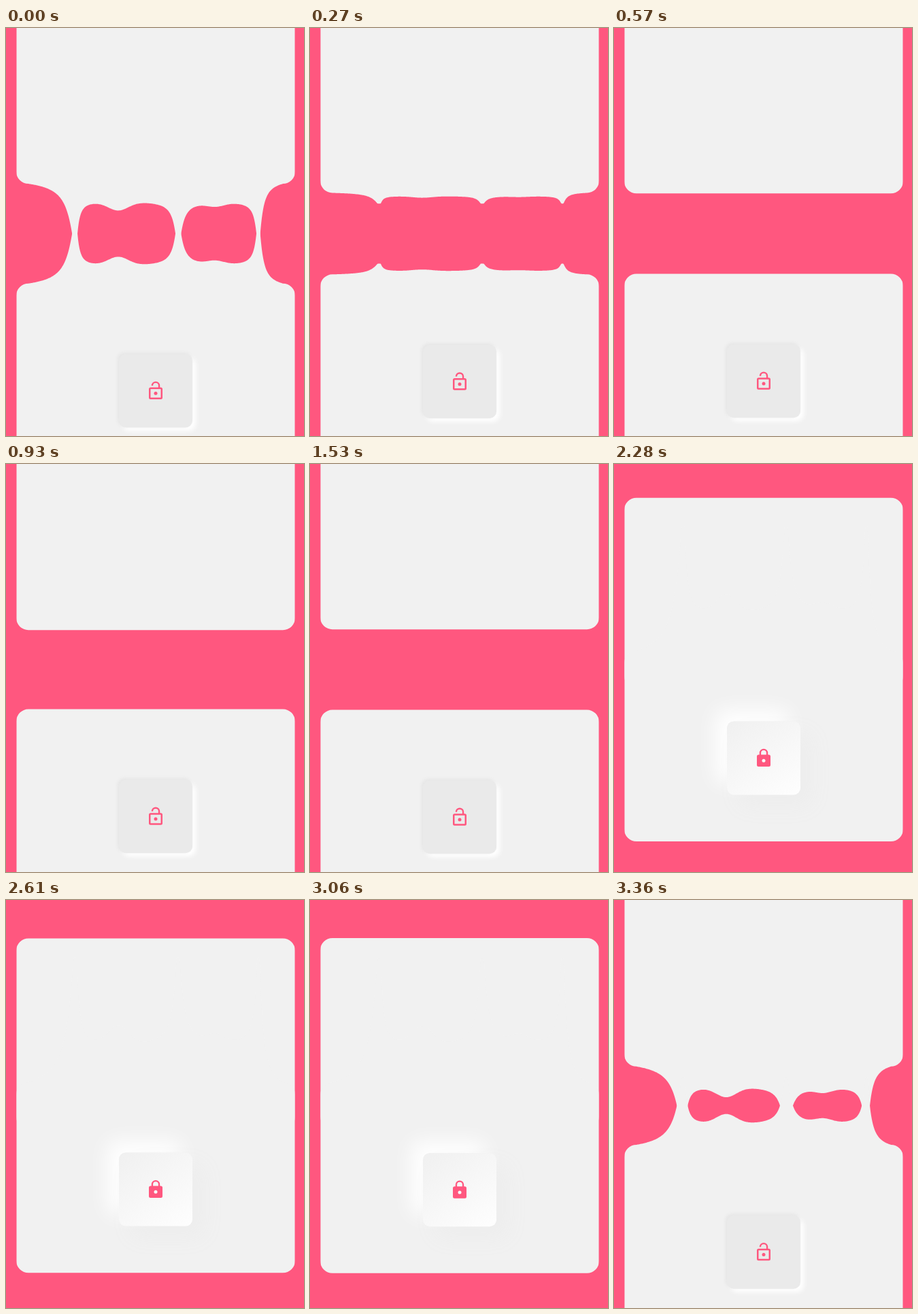
Animation of 438 by 600 pixels, one loop 3.39 s. Source, as an HTML page:

```html
<!DOCTYPE html>
<html lang="en">
<head>
<meta charset="utf-8">
<title>Lock toggle</title>
<style>
  html, body { margin: 0; width: 100%; height: 100%; overflow: hidden; background: #ff577f; }
  #stage { position: relative; width: 438px; height: 600px; overflow: hidden; }
  #panels { position: absolute; inset: 0; fill: #f1f1f1; clip-path: inset(0 13.5px 0 15.5px); }
  #button { position: absolute; left: 166px; top: 0; width: 108px; height: 108px; }
  .face { position: absolute; inset: 0; border-radius: 10px; }
  #raised {
    background: linear-gradient(145deg, #f0f0f0, #fefefe);
    box-shadow: 17px 17px 32px #ededed, -17px -17px 30px #fff;
  }
  #pressed {
    background: #eaeaea;
    box-shadow: -2px -2px 5px #e5e5e5, 5px 5px 7px #fff;
  }
  #icon { position: absolute; left: 39px; top: 39px; fill: none; stroke: #ff577f; stroke-width: 1.9; }
  #body { fill: #ff577f; stroke-width: 2; }
  #dot { fill: #f8f8f8; stroke: none; }
  .open #body { fill: none; }
  .open #dot { fill: #ff577f; }
  .open #stem { display: none; }
</style>
</head>
<body>
<div id="stage">
  <svg id="panels" width="438" height="600"><path id="upper"/><path id="lower"/></svg>
  <div id="button">
    <div class="face" id="raised"></div>
    <div class="face" id="pressed"></div>
    <svg id="icon" width="30" height="30" viewBox="0 0 24 24">
      <path d="M7.95 6a4.05 4.05 0 0 1 8.1 0v3"/>
      <path id="stem" d="M7.95 5.9V9"/>
      <rect id="body" x="5" y="9" width="14" height="12" rx="1"/>
      <circle id="dot" cx="12" cy="15" r="2"/>
    </svg>
  </div>
</div>
<script>
const LOOP = 3390, OPEN_AT = 3214 - LOOP, CLOSE_AT = 1599, CLOSE_SHOWN = 1638;
const LEFT = 15, RIGHT = 425, HEIGHT = 280.4, RADIUS = 18, MIDDLE = 302.4;
const CLOSED = -33.4, OPENED = 59.3;

// Strands of goo: position and how widely each side spreads.
const STRANDS = [
  { x: 102.5, left: 10, right: 3.5 },
  { x: 253, left: 5.5, right: 6 },
  { x: 371, left: 4, right: 5 }
];
const PEAK = 116, TIP = 98, FILM = 28;

const $ = id => document.getElementById(id);
const clamp = v => Math.min(1, Math.max(0, v));
const falloff = d => 1 / (1 + d ** 1.5);
const hump = (x, center, width) => Math.exp(-(((x - center) / width) ** 2));

function elasticOut(u) {
  if (u <= 0) return 0;
  return 1 + 2 ** (-10 * u) * Math.sin((u - 0.075) * 2 * Math.PI / 0.3);
}

// How far the goo reaches beyond a panel's straight edge at x.
function gooAt(x) {
  const next = STRANDS.findIndex(s => s.x > x);
  const a = STRANDS.at(next < 0 ? -1 : next - 1), b = STRANDS[next];
  if (next === 0) {
    const d = b.x - x;
    return PEAK * falloff(d / b.left) * (1 - (d / (b.x - LEFT - RADIUS)) ** 2);
  }
  if (next < 0) {
    const d = x - a.x;
    return PEAK * falloff(d / a.right) * (1 - (d / (RIGHT - RADIUS - a.x)) ** 2);
  }
  const film = FILM + 14 * hump(x, 165, 21) + 6 * hump(x, 308, 18);
  return film + (PEAK - FILM) * (falloff((x - a.x) / a.right) + falloff((b.x - x) / b.left));
}

const goo = [];
for (let x = RIGHT - RADIUS; x >= LEFT + RADIUS; x--) goo.push([x, Math.min(TIP, gooAt(x))]);

function panelPath(reach) {
  const r = RADIUS, arc = (dx, dy) => `a${r} ${r} 0 0 1 ${dx} ${dy}`;
  const edge = goo.map(([x, y]) => `L${x} ${(y * reach).toFixed(2)}`).join("");
  return `M${LEFT} ${r - HEIGHT}${arc(r, -r)}H${RIGHT - r}${arc(r, r)}V${-r}${arc(-r, r)}`
    + `${edge}${arc(-r, -r)}Z`;
}

function pose(t) {
  if (t >= OPEN_AT + LOOP) t -= LOOP;
  const opening = t < CLOSE_SHOWN;
  const age = t - (opening ? OPEN_AT : CLOSE_AT);
  const [from, to] = opening ? [CLOSED, OPENED] : [OPENED, CLOSED];
  const gap = from + (to - from) * elasticOut(age / 2000);

  const left = (1 - clamp(age / 800)) ** 3;
  const d = panelPath(1.87 * (opening ? left : 1 - left));
  $("upper").setAttribute("d", d);
  $("lower").setAttribute("d", d);
  $("upper").setAttribute("transform", `translate(0 ${MIDDLE - gap})`);
  $("lower").setAttribute("transform", `translate(0 ${MIDDLE + gap}) scale(1 -1)`);

  const fade = clamp(age / 110);
  $("pressed").style.opacity = opening ? fade : 1 - fade;
  $("raised").style.opacity = opening ? 1 - fade : fade;
  $("button").classList.toggle("open", opening);
  $("button").style.transform = `translateY(${MIDDLE + gap + 103.7}px)`;
}

const start = performance.now();
function tick() {
  pose((performance.now() - start) % LOOP);
  requestAnimationFrame(tick);
}
tick();
</script>
</body>
</html>
```
